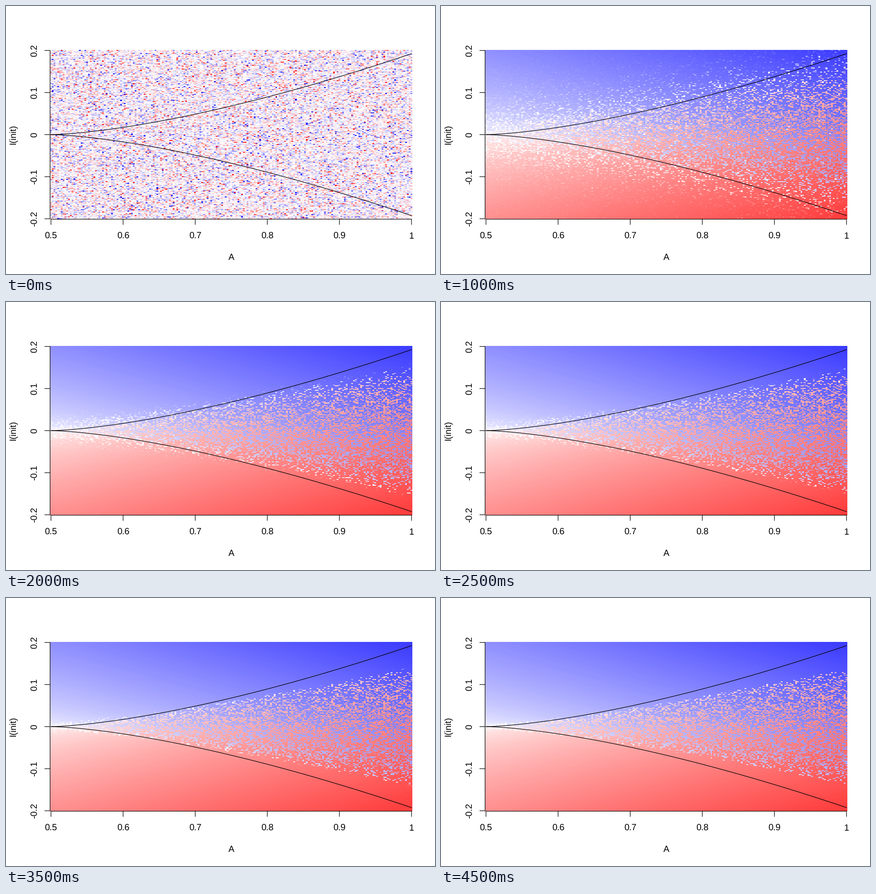
Write a matplotlib script that moves like this. It is 947 px wide and 592 px high and loops after 5000 ms.

```python
import numpy as np
import matplotlib.pyplot as plt
from matplotlib.animation import FuncAnimation

W, H, DPI = 947, 592, 100
N = 201            # cells per side
FRAMES = 10
STEPS, DT = 33, 0.1
SPREAD = 0.7       # scale of the random starts
GAIN = 3.95        # weight of the input term
FULL = 3.45        # state shown at full colour
SHADES = 100

# plot region, with margins counted in text lines
LINE = 23.74
LEFT, RIGHT = 4.1 * LINE, W - 2.1 * LINE
TOP, BOTTOM = 4.1 * LINE, H - 5.1 * LINE
MID_X, MID_Y = (LEFT + RIGHT) / 2, (TOP + BOTTOM) / 2
SPAN_X = (RIGHT - LEFT) * (N - 1) / N
SPAN_Y = (BOTTOM - TOP) * (N - 1) / N
TICK = LINE / 2
PT = 72 / DPI

A = np.linspace(0.5, 1, N)[None, :]
I = np.linspace(0.2, -0.2, N)[:, None]


def states():
    """Relaxation of random starts towards the two stable branches."""
    u = np.random.default_rng(7).laplace(0, SPREAD, (N, N))
    out = [u]
    for _ in range(FRAMES - 1):
        for _ in range(STEPS):
            u = u + DT * (-u + 2 * A * np.tanh(u) + GAIN * I)
        out.append(u)
    return out


def colours(u):
    sat = np.clip((np.abs(u) / FULL) ** 1.2, 0, 1)
    sat = np.round(sat * SHADES) / SHADES
    pale = 1 - sat
    return np.dstack([np.where(u > 0, pale, 1), pale, np.where(u > 0, 1, pale)])


def px(a):
    return MID_X + SPAN_X * (a - 0.75) / 0.5


def py(i):
    return MID_Y - SPAN_Y * i / 0.4


images = [colours(u) for u in states()]

plt.rcParams["font.family"] = "Liberation Sans"
plt.rcParams["text.hinting"] = "none"
fig = plt.figure(figsize=(W / DPI, H / DPI), dpi=DPI, facecolor="white")
ax = fig.add_axes([0, 0, 1, 1])
ax.axis("off")
heat = ax.imshow(images[0], extent=(LEFT, RIGHT, BOTTOM, TOP), aspect="auto",
                 interpolation="nearest")
ax.set_xlim(0, W)
ax.set_ylim(H, 0)


def line(x, y):
    ax.plot(x, y, color="black", lw=LINE / 19.2 * PT,
            solid_capstyle="round", snap=False)


def label(x, y, text, turn=0):
    ax.text(x, y, text, fontsize=LINE / 1.2 * PT, ha="center", va="baseline",
            rotation=turn, rotation_mode="anchor", color="black")


line([px(0.5), px(1)], [BOTTOM, BOTTOM])
for a in (0.5, 0.6, 0.7, 0.8, 0.9, 1):
    line([px(a), px(a)], [BOTTOM, BOTTOM + TICK])
    label(px(a), BOTTOM + 1.8 * LINE, f"{a:g}")

line([LEFT, LEFT], [py(0.2), py(-0.2)])
for i in (-0.2, -0.1, 0, 0.1, 0.2):
    line([LEFT - TICK, LEFT], [py(i), py(i)])
    label(LEFT - 1.2 * LINE, py(i), f"{i:g}", 90)

label(MID_X, BOTTOM + 3.8 * LINE, "A")
label(LEFT - 3.2 * LINE, MID_Y, "I(init)", 90)

a = np.linspace(0.5, 1, 101)
fold = (2 / 3 * (a - 0.5)) ** 1.5
line(px(a), py(fold))
line(px(a), py(-fold))


def draw(n):
    heat.set_data(images[n])
    return [heat]


anim = FuncAnimation(fig, draw, frames=FRAMES, interval=500, repeat=True,
                     repeat_delay=0, blit=False)
plt.show()
```
